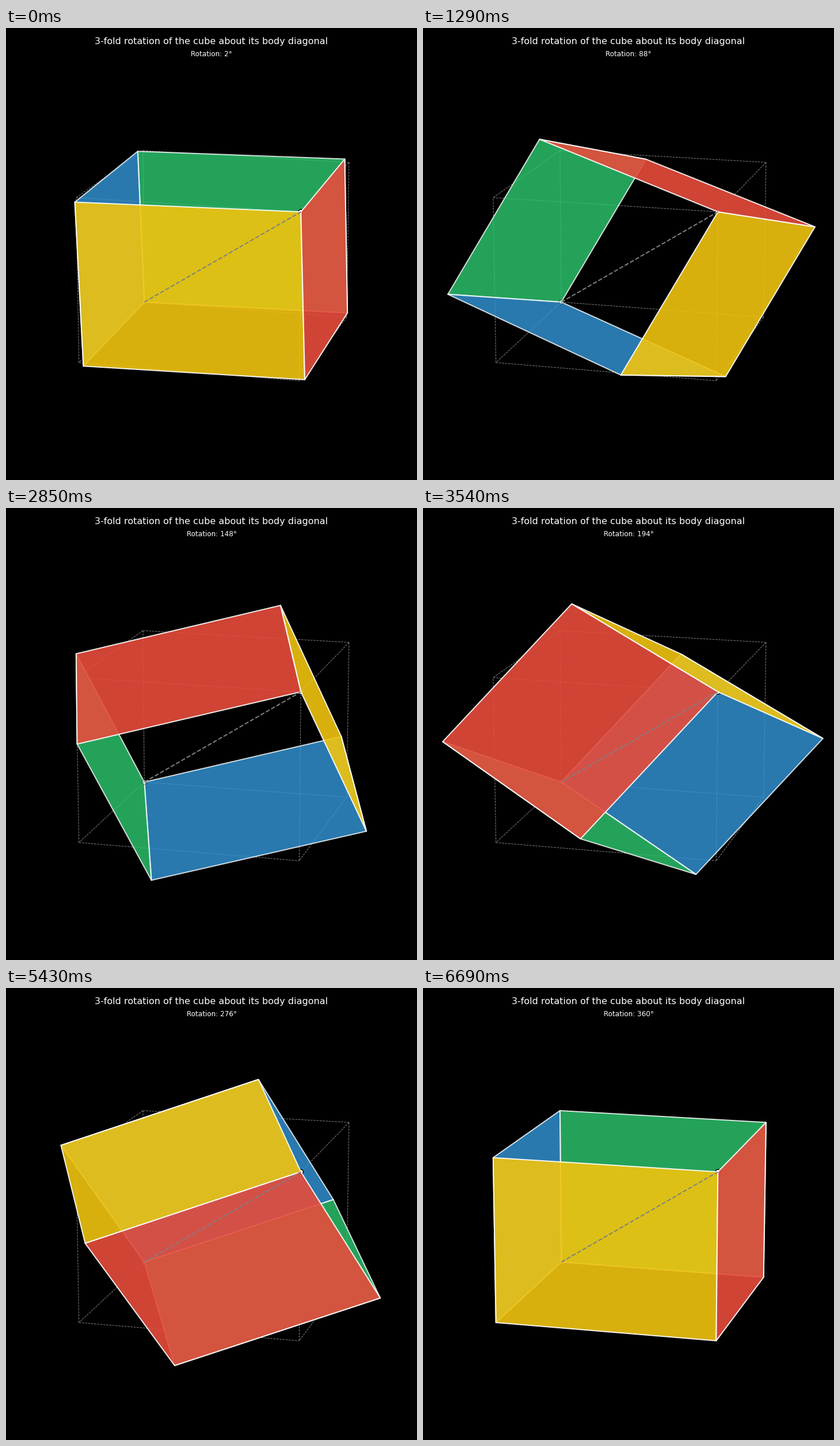
These frames come from a looping animation (714x785 px, 7.38 s). A matplotlib script:

```python
import itertools

import matplotlib.pyplot as plt
import numpy as np
from matplotlib.animation import FuncAnimation

W, H, DPI = 714, 785, 72
STEP = 2                     # degrees per frame
TURN_FRAMES, HOLD_FRAMES = 60, 22
PERIOD = TURN_FRAMES + HOLD_FRAMES

# Camera: perspective view, lengths in pixels at the cube's centre
ELEV = AZIM = np.radians(15)
CENTER = np.array([367.0, 403.0])
HALF = np.array([191.44, 191.44, 143.58])
DISTANCE = 3859.5

RIGHT = np.array([-np.sin(AZIM), np.cos(AZIM), 0])
TOWARD = np.array([np.cos(ELEV) * np.cos(AZIM),
                   np.cos(ELEV) * np.sin(AZIM),
                   np.sin(ELEV)])
UP = np.cross(TOWARD, RIGHT)


def project(points):
    """Return screen positions and distances from the camera."""
    p = np.asarray(points, float) * HALF
    depth = DISTANCE - p @ TOWARD
    scale = DISTANCE / depth
    x = CENTER[0] + scale * (p @ RIGHT)
    y = CENTER[1] - scale * (p @ UP)
    return np.column_stack([x, y]), depth


def rotation(degrees):
    """Rotation matrix about the (1, 1, 1) direction."""
    t = np.radians(degrees)
    n = np.ones(3) / np.sqrt(3)
    cross = np.array([[0, -n[2], n[1]], [n[2], 0, -n[0]], [-n[1], n[0], 0]])
    return np.eye(3) + np.sin(t) * cross + (1 - np.cos(t)) * cross @ cross


def face(axis, sign):
    """Corners of the cube face where the given axis equals sign."""
    loop = [(-1, -1), (1, -1), (1, 1), (-1, 1)]
    return np.array([np.insert(np.array(c), axis, sign) for c in loop])


fig = plt.figure(figsize=(W / DPI, H / DPI), dpi=DPI, facecolor="black")
ax = fig.add_axes([0, 0, 1, 1])
ax.set_xlim(0, W)
ax.set_ylim(H, 0)
ax.axis("off")

ax.text(W / 2, 28, "3-fold rotation of the cube about its body diagonal",
        color="white", fontsize=16, ha="center", va="baseline")
label = ax.text(W / 2, 49, "", color="white", fontsize=12,
                ha="center", va="baseline")

# Fixed outline of the cube
corners = np.array(list(itertools.product((-1, 1), repeat=3)))
for a, b in itertools.combinations(corners, 2):
    if np.abs(a - b).sum() == 2:
        xy, _ = project([a, b])
        ax.plot(*xy.T, "--", color="gray", lw=1, zorder=1)

# Rotation axis and its end points
ends, end_depth = project([(-1, -1, -1), (1, 1, 1)])
ax.plot(*ends.T, "--", color="gray", lw=2, zorder=20)
dots = ax.scatter(*ends.T, s=70, linewidths=1.5,
                  facecolors=[(1, 1, 1, 0.3), (1, 1, 1, 1)],
                  edgecolors=[(0, 0, 0, 0.3), (0, 0, 0, 1)])

# axis, side, colour, opacity
FACES = [(0, -1, "#2ecc71", 0.8),
         (1, -1, "#3498db", 0.8),
         (0, 1, "#f1c40f", 0.9),
         (1, 1, "#e74c3c", 0.9)]
shapes = [face(axis, sign) for axis, sign, _, _ in FACES]
patches = []
for shape, (_, _, color, alpha) in zip(shapes, FACES):
    patch = plt.Polygon(project(shape)[0], closed=True, facecolor=color,
                        edgecolor="white", alpha=alpha, lw=2,
                        joinstyle="round")
    patches.append(ax.add_patch(patch))


def update(i):
    turn, step = divmod(i, PERIOD)
    angle = STEP * (TURN_FRAMES * turn + min(step + 1, TURN_FRAMES))
    label.set_text(f"Rotation: {angle}°")

    matrix = rotation(angle)
    layers = [(end_depth.min(), dots)]
    for shape, patch in zip(shapes, patches):
        xy, depth = project(shape @ matrix.T)
        patch.set_xy(xy)
        layers.append((depth.min(), patch))

    # Paint far to near, judged by each part's closest point
    layers.sort(key=lambda layer: -round(layer[0], 4))
    for rank, (_, artist) in enumerate(layers):
        artist.set_zorder(3 + rank)
    return [label, dots, *patches]


anim = FuncAnimation(fig, update, frames=3 * PERIOD, interval=30,
                     repeat=True, repeat_delay=0)
plt.show()
```
